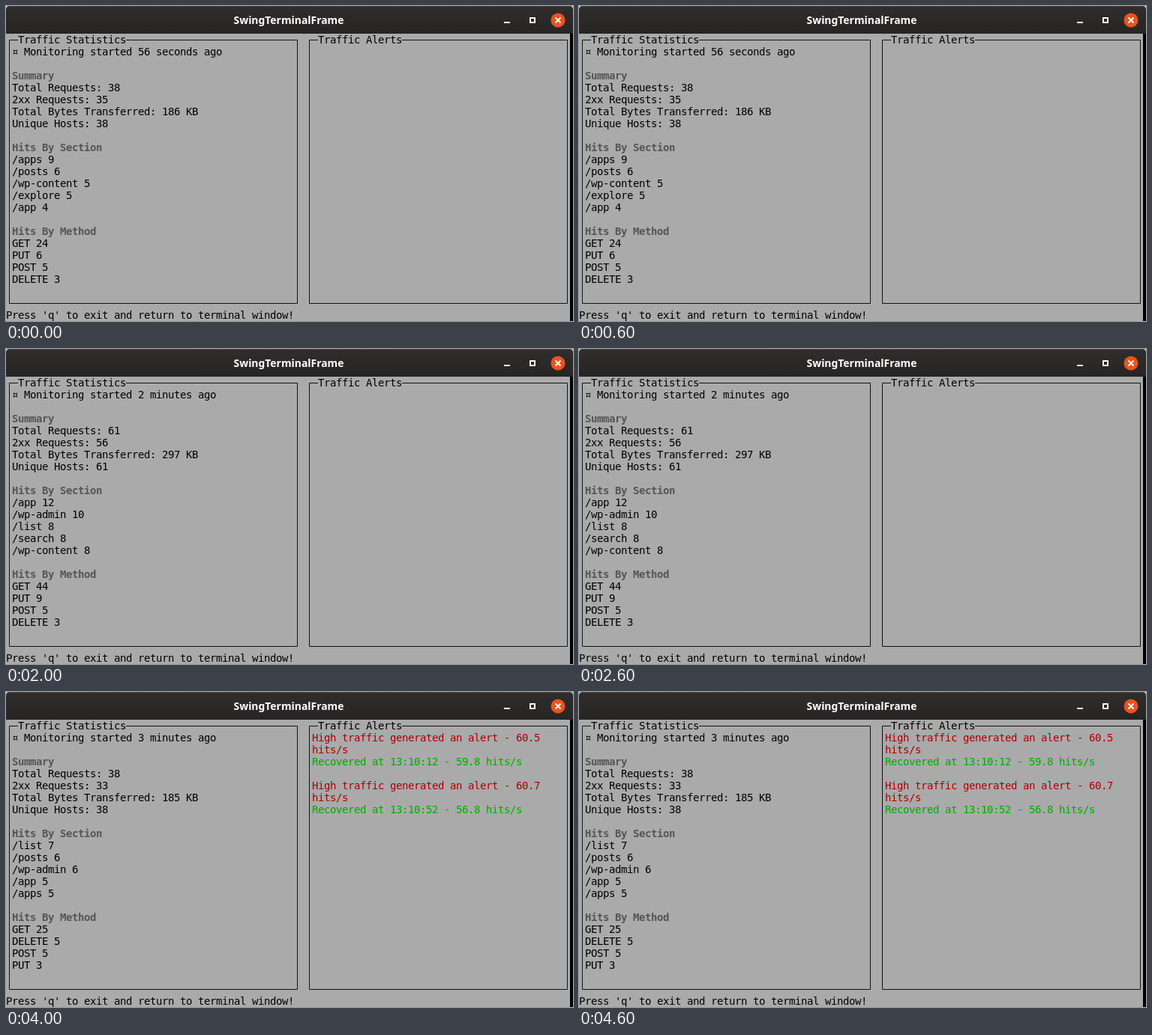
An HTML page that plays this animation: 756 by 421 pixels, repeating every 5000 ms.

```html
<!DOCTYPE html>
<html lang="en">
<head>
<meta charset="utf-8">
<title>Traffic monitor</title>
<style>
  html, body { margin: 0; width: 100%; height: 100%; overflow: hidden; background: #000; }
  svg { display: block; width: 756px; height: 421px; }
  .cells { font: 14px "DejaVu Sans Mono", monospace; white-space: pre; }
  .heading { font-weight: bold; }
  .title { font: bold 13.9px "Noto Sans", "Open Sans", sans-serif; }
</style>
</head>
<body>
<svg viewBox="0 0 756 421" xmlns="http://www.w3.org/2000/svg">
  <defs>
    <linearGradient id="bar" x2="0" y2="1">
      <stop stop-color="#302e2c"/>
      <stop offset="1" stop-color="#272524"/>
    </linearGradient>
  </defs>
  <rect width="756" height="12" fill="#d8d8d8"/>
  <path d="M0 37V5Q0 0 5 0H751Q756 0 756 5V37Z" fill="url(#bar)"/>
  <path d="M5 .5H751" stroke="#45423f"/>
  <text class="title" x="377" y="24" text-anchor="middle" fill="#fff">SwingTerminalFrame</text>
  <path d="M664 22H672M699 16H705V22H699Z" fill="none" stroke="#fff" stroke-width="2"/>
  <circle cx="736" cy="19" r="9.5" fill="#e95420"/>
  <path d="M732.5 15.5l7 7m0-7l-7 7" stroke="#fff" stroke-width="1.8"/>
  <rect y="37" width="752" height="384" fill="#aaa"/>
  <g id="frame" class="cells"></g>
  <g id="screen" class="cells"></g>
</svg>
<script>
const CELL_W = 8, CELL_H = 16, TOP = 37, ASCENT = 13;
const BLACK = '#000', GREY = '#555', RED = '#a00', GREEN = '#0a0';
const STEP = 1000;

const frame = document.getElementById('frame');
const screen = document.getElementById('screen');

function add(parent, tag, attrs) {
  const node = document.createElementNS('http://www.w3.org/2000/svg', tag);
  for (const key in attrs) node.setAttribute(key, attrs[key]);
  return parent.appendChild(node);
}

// Every character sits in its own terminal cell.
function print(parent, col, row, text, fill = BLACK) {
  const x = [...text].map((_, i) => (col + i) * CELL_W).join(' ');
  const y = TOP + row * CELL_H + ASCENT;
  const attrs = { x, y, fill };
  if (fill === GREY) attrs.class = 'heading';
  add(parent, 'text', attrs).textContent = text;
}

function panel(left, right, title) {
  const x1 = left * CELL_W + 4.5, x2 = right * CELL_W + 4.5;
  const start = (left + 2) * CELL_W, end = start + title.length * CELL_W;
  add(frame, 'path', {
    d: `M${start} 45.5H${x1}V397.5H${x2}V45.5H${end}`,
    fill: 'none', stroke: '#111'
  });
  print(frame, left + 2, 0, title);
}

const states = [
  { age: '56 seconds', total: 38, ok: 35, size: 186, alerts: 0,
    sections: ['apps 9', 'posts 6', 'wp-content 5', 'explore 5', 'app 4'],
    methods: ['GET 24', 'PUT 6', 'POST 5', 'DELETE 3'] },
  { age: '1 minute', total: 38, ok: 35, size: 185, alerts: 0,
    sections: ['app 8', 'explore 7', 'list 5', 'search 5', 'wp-content 4'],
    methods: ['GET 29', 'PUT 4', 'DELETE 3', 'POST 2'] },
  { age: '2 minutes', total: 61, ok: 56, size: 297, alerts: 0,
    sections: ['app 12', 'wp-admin 10', 'list 8', 'search 8', 'wp-content 8'],
    methods: ['GET 44', 'PUT 9', 'POST 5', 'DELETE 3'] },
  { age: '2 minutes', total: 61, ok: 52, size: 298, alerts: 3,
    sections: ['posts 12', 'wp-content 12', 'explore 11', 'list 9', 'wp-admin 5'],
    methods: ['GET 37', 'PUT 10', 'DELETE 9', 'POST 5'] },
  { age: '3 minutes', total: 38, ok: 33, size: 185, alerts: 4,
    sections: ['list 7', 'posts 6', 'wp-admin 6', 'app 5', 'apps 5'],
    methods: ['GET 25', 'DELETE 5', 'POST 5', 'PUT 3'] }
];

const high = rate => ({ fill: RED, lines: [`High traffic generated an alert - ${rate}`, 'hits/s'] });
const recovered = (time, rate) => ({ fill: GREEN, lines: [`Recovered at ${time} - ${rate} hits/s`, ''] });
const alerts = [high(60.5), recovered('13:10:12', 59.8), high(60.7), recovered('13:10:52', 56.8)];

function draw(state) {
  screen.replaceChildren();
  const list = (row, heading, lines) => {
    print(screen, 1, row, heading, GREY);
    lines.forEach((line, i) => print(screen, 1, row + 1 + i, line));
  };
  print(screen, 1, 1, `¤ Monitoring started ${state.age} ago`);
  list(3, 'Summary', [
    `Total Requests: ${state.total}`,
    `2xx Requests: ${state.ok}`,
    `Total Bytes Transferred: ${state.size} KB`,
    `Unique Hosts: ${state.total}`
  ]);
  list(9, 'Hits By Section', state.sections.map(s => '/' + s));
  list(16, 'Hits By Method', state.methods);
  alerts.slice(0, state.alerts).forEach(({ fill, lines }, i) =>
    lines.forEach((line, j) => line && print(screen, 51, 1 + 2 * i + j, line, fill)));
}

panel(0, 48, 'Traffic Statistics');
panel(50, 93, 'Traffic Alerts');
print(frame, 0, 23, "Press 'q' to exit and return to terminal window!");

let shown = -1;
const begin = performance.now();
function tick() {
  const index = Math.floor((performance.now() - begin) / STEP) % states.length;
  if (index !== shown) draw(states[shown = index]);
  requestAnimationFrame(tick);
}
tick();
</script>
</body>
</html>
```
